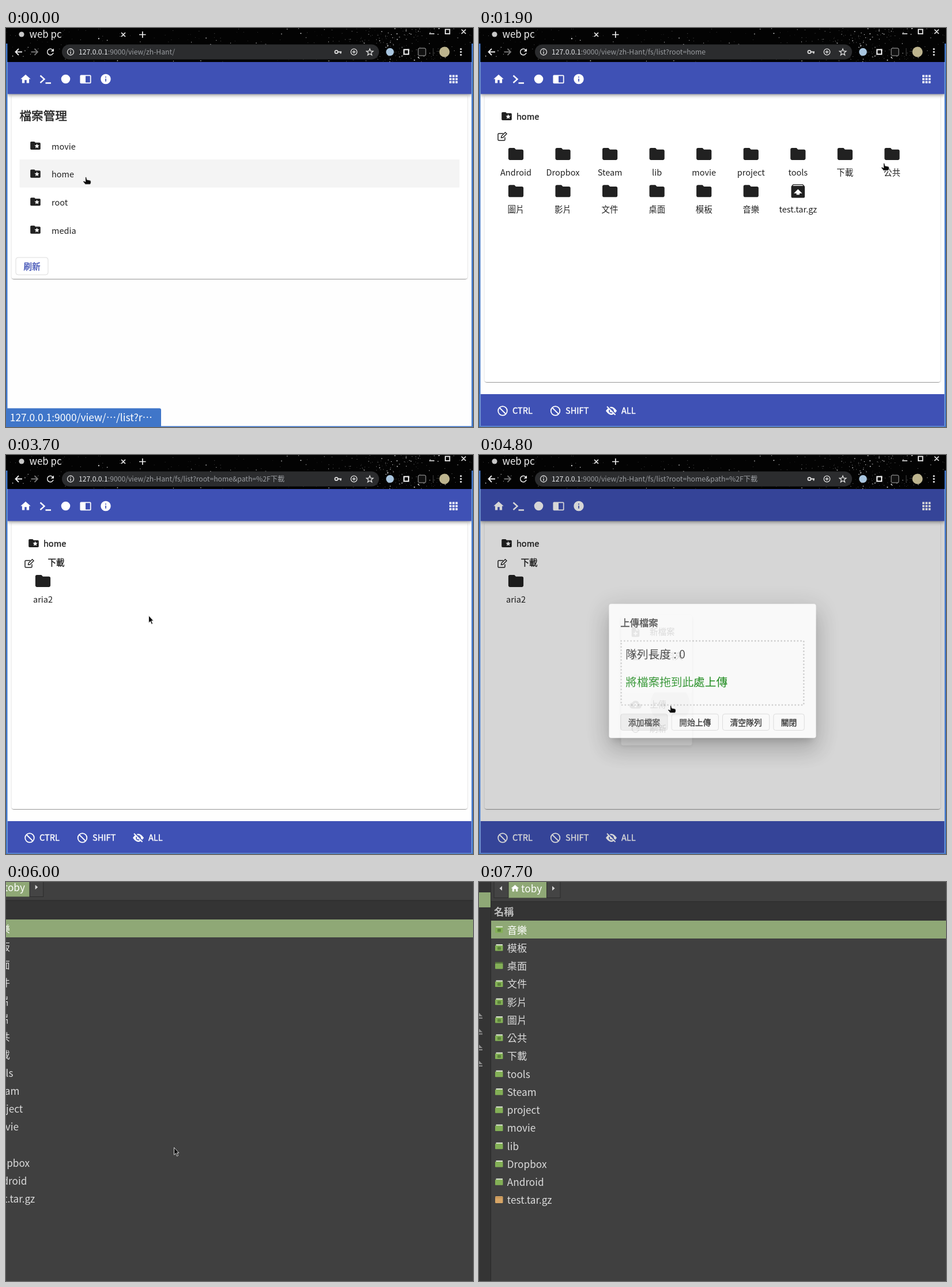
These frames come from a looping animation (810 by 692 pixels, 8000 ms). An HTML page:

```html
<!DOCTYPE html>
<html lang="zh-Hant">
<head>
<meta charset="utf-8">
<title>web pc</title>
<style>
html, body { margin: 0; width: 100%; height: 100%; overflow: hidden; background: #fff; }
svg { display: block; width: 100%; height: 100%; }
text { font-family: "Noto Sans CJK TC", "Noto Sans CJK SC", "Noto Sans CJK JP", "Noto Sans CJK", sans-serif; white-space: pre; }
</style>
</head>
<body>
<svg viewBox="0 0 810 692" xmlns="http://www.w3.org/2000/svg">
  <defs>
    <clipPath id="page"><rect x="2.5" y="59" width="805" height="631.5"/></clipPath>
    <clipPath id="row"><rect x="24" y="228" width="763" height="48.6"/></clipPath>
    <clipPath id="upload"><rect x="247" y="411.5" width="122" height="42"/></clipPath>
    <clipPath id="add"><rect x="236" y="453" width="87" height="31" rx="4"/></clipPath>
  </defs>
  <g id="view"></g>
</svg>
<script>
const LOOP = 8000, STEP = 100;
const INK = '#212121', INDIGO = '#3f51b5', FRAME = '#4076c9';
const view = document.getElementById('view');
const clamp = v => Math.max(0, Math.min(1, v));
const each = (list, fn) => list.map(fn).join('');

// Drawing helpers
const rect = (x, y, w, h, fill, more = '') => `<rect x="${x}" y="${y}" width="${w}" height="${h}" fill="${fill}" ${more}/>`;
const disc = (x, y, r, fill, more = '') => `<circle cx="${x}" cy="${y}" r="${r}" fill="${fill}" ${more}/>`;
const line = (d, color, w = 1.6, more = '') => `<path d="${d}" fill="none" stroke="${color}" stroke-width="${w}" ${more}/>`;
const text = (x, y, str, size, fill = INK, more = '') => `<text x="${x}" y="${y}" font-size="${size}" fill="${fill}" ${more}>${str}</text>`;
const MIDDLE = 'text-anchor="middle"';
// Medium weight: regular glyphs with a thin outline
const medium = (x, y, str, size, fill = INK, more = '') => text(x, y, str, size, fill, `stroke="${fill}" stroke-width=".4" ${more}`);

// Raised surface; each shadow is offset, blur, spread, opacity
const CARD = [[2, 1, -1, .2], [1, 1, 0, .14], [1, 3, 0, .12]];
const RAISED = [[2, 4, -1, .2], [4, 5, 0, .14], [1, 10, 0, .12]];
const MODAL = [[11, 15, -7, .2], [24, 38, 3, .14], [9, 46, 8, .12]];
const surface = (x, y, w, h, fill, radius, shadows) =>
  each(shadows, ([dy, blur, s, a]) => rect(x - s, y - s + dy, w + 2 * s, h + 2 * s, '#000', `rx="${radius}" opacity="${a}" style="filter:blur(${blur / 2}px)"`)) +
  rect(x, y, w, h, fill, `rx="${radius}"`);

// Icons on a 24 unit grid
const FOLDER = 'M10 4H4C2.9 4 2 4.9 2 6V18C2 19.1 2.9 20 4 20H20C21.1 20 22 19.1 22 18V8C22 6.9 21.1 6 20 6H12z';
const ICONS = {
  home: 'M10 20v-6h4v6h5v-8h3L12 3 2 12h3v8z',
  info: 'M12 2a10 10 0 1 0 0 20a10 10 0 1 0 0-20zM11 11h2v6h-2zM11 7h2v2h-2z',
  book: 'M21 4H3Q1 4 1 6V19Q1 21 3 21H21Q23 21 23 19V6Q23 4 21 4zM21 19H12V6H21z',
  folder: FOLDER,
  special: FOLDER + 'M17.9 17L15 15.3 12.1 17 12.8 13.7 10.3 11.4 13.7 11.1 15 8 16.3 11.1 19.7 11.4 17.2 13.7z',
  archive: 'M20.5 5.2L19 3.5Q18.7 3 18 3H6Q5.3 3 4.9 3.5L3.5 5.2Q3 5.8 3 6.5V19Q3 21 5 21H19Q21 21 21 19V6.5Q21 5.8 20.5 5.2zM12 9.5L17.5 15H14V17H10V15H6.5zM5.1 5L5.9 4H18L18.9 5z',
  fileAdd: 'M14 2H6Q4 2 4 4V20Q4 22 6 22H18Q20 22 20 20V8zM16 16H13V19H11V16H8V14H11V11H13V14H16zM13 9V3.5L18.5 9z',
  folderAdd: FOLDER + 'M19 14H16V17H14V14H11V12H14V9H16V12H19z',
  paste: 'M19 2H15A3 3 0 0 0 9 2H5Q3 2 3 4V20Q3 22 5 22H19Q21 22 21 20V4Q21 2 19 2zM7 5H17V4H19V20H5V4H7z',
  cloud: 'M19.3 10A7.5 7.5 0 0 0 5.3 8A6 6 0 0 0 6 20H19A5 5 0 0 0 19.3 10zM14 13V17H10V13H7L12 8 17 13z',
  reload: 'M17.6 6.4A8 8 0 1 0 19.7 14H17.6A6 6 0 1 1 16.2 7.8L13 11H20V4z'
};
const icon = (name, x, y, k, fill = INK) =>
  `<path transform="translate(${x - 12 * k} ${y - 12 * k}) scale(${k})" fill="${fill}" fill-rule="evenodd" d="${ICONS[name]}"/>`;

// Cursor path: time, x, y of the tip
const TRACK = [
  [0, 138, 257], [100, 139, 257], [900, 139, 257], [1800, 702, 235], [1900, 702, 233],
  [2200, 652, 264], [2400, 596, 242], [2600, 630, 214], [3200, 630, 214], [3700, 247, 278],
  [4100, 247, 278], [4200, 288, 350], [4300, 332, 433], [4800, 332, 433], [5300, 341, 462],
  [5400, 341, 462], [5800, 291, 460], [6300, 291, 460], [6400, 199, 180], [6500, 509, -12]
];
function tip(t) {
  const i = TRACK.findIndex(k => k[0] > t);
  if (i < 0) return TRACK[TRACK.length - 1].slice(1);
  const [t0, x0, y0] = TRACK[i - 1], [t1, x1, y1] = TRACK[i], p = (t - t0) / (t1 - t0);
  return [x0 + (x1 - x0) * p, y0 + (y1 - y0) * p];
}
const ARROW = 'M.5 .5V13.2L3.4 10.5 5.4 15.4 7.6 14.5 5.5 9.8H9z';
const HAND = 'M-.5 2Q.6 .8 1.6 2L2.4 6 8.5 7.3 9.3 9V12L8 14.2H-.5L-4.2 9.5Q-4.300 8.2-2.700 8.400L-.2 9.600z';
function cursor(t) {
  const [x, y] = tip(t);
  const arrow = t >= 6000 || (t >= 3400 && t < 4200);
  return `<path transform="translate(${x} ${y})" d="${arrow ? ARROW : HAND}" fill="#0a0a0a" stroke="#eee" stroke-width=".9"/>`;
}

// Seeded star field behind the window title
let seed = 7;
const rnd = () => (seed = seed * 16807 % 2147483647) / 2147483647;
const stars = each(Array.from({ length: 420 }), (_, i) => {
  const x = i < 260 ? rnd() * 810 : 570 + (rnd() + rnd()) * 100;
  return disc(x.toFixed(1), (rnd() * 59).toFixed(1), (.35 + rnd() ** 4 * .75).toFixed(2), '#fff', `opacity="${(.3 + rnd() * .65).toFixed(2)}"`);
});

const chrome = rect(0, 0, 810, 59, '#030303') + stars +
  disc(27, 11, 4.6, '#c8c8c8') + text(40.5, 17, 'web pc', 16.9, '#f2f2f2') +
  line('M200 8L207 15M207 8L200 15M231 11.5H242.5M236.8 6V17M790 2.5L797.5 10M797.5 2.5L790 10M734 10H743', '#eee', 1.7) +
  rect(762, 2.5, 7.5, 7.5, 'none', 'stroke="#eee" stroke-width="1.8"') +
  line('M28 41.5H16.500M22 36L16.5 41.5 22 47', '#eee', 1.8) +
  line('M43.5 41.5H55M49.5 36L55 41.5 49.5 47', '#777', 1.8) +
  icon('reload', 77, 41.5, .75, '#eee') +
  rect(97, 28.5, 550, 26, '#2b2c2e', 'rx="13"') +
  disc(112, 41.5, 5.5, 'none', 'stroke="#ddd" stroke-width="1.3"') + line('M112 40.7V45M112 38V39.5', '#ddd', 1.4) +
  disc(573, 41.5, 2.6, 'none', 'stroke="#ddd" stroke-width="1.8"') + line('M576 41.5H582M580.5 41.5V44.5', '#ddd', 2) +
  disc(603.5, 41.5, 5.3, 'none', 'stroke="#ddd" stroke-width="1.3"') + line('M600.5 41.5H606.5M603.5 38.5V44.5', '#ddd', 1.3) +
  line('M631 36L632.6 40 636.8 40.2 633.5 42.9 634.6 47 631 44.7 627.4 47 628.5 42.9 625.2 40.2 629.4 40z', '#ddd', 1.3) +
  disc(666, 41.5, 6.8, '#a9c6e0') + rect(690.3, 37.5, 8, 8, '#050505', 'stroke="#fff" stroke-width="2"') +
  rect(715, 35, 13, 13, '#111', 'rx="2" stroke="#aaa"') + rect(740.5, 35, 1, 13, '#444') + disc(760.5, 41.5, 9, '#bdb48e') +
  each([36.5, 41.5, 46.5], y => disc(789, y, 1.6, '#eee'));

const windowEdge = rect(0, 27, 2.5, 665, FRAME) + rect(807.5, 27, 2.5, 665, FRAME) + rect(0, 690.5, 810, 1.5, FRAME);

const appBar = surface(2.5, 59, 805, 55.5, INDIGO, 0, RAISED) +
  icon('home', 34, 88.5, .87, '#fff') +
  line('M59.5 82.5L66.5 88.8 59.5 95M68.5 95.5H78', '#fff', 2.4) +
  disc(103.5, 88.5, 7.8, '#fff') + icon('book', 138, 88.5, .87, '#fff') + icon('info', 173, 88.5, .87, '#fff') +
  each([0, 1, 2, 3, 4, 5, 6, 7, 8], i => rect(769 + i % 3 * 5.3, 81.5 + (i / 3 | 0) * 5.3, 3.7, 3.7, '#fff'));

const block = x => disc(x, 664, 7.8, 'none', 'stroke="#fff" stroke-width="1.8"') + line(`M${x - 5.5} 658.5L${x + 5.5} 669.5`, '#fff', 1.8);
const bottomBar = rect(2.5, 635, 805, 56, INDIGO) + block(41) + block(132.5) +
  '<path d="M220 664Q229.5 650 239 664Q229.5 678 220 664z" fill="#fff"/>' +
  disc(229.5, 664, 4.4, INDIGO) + disc(229.5, 664, 2.6, '#fff') +
  line('M223.5 656L238 670.5', INDIGO, 2) + line('M222 656.5L236.5 671', '#fff', 1.8) +
  each([[58, 'CTRL'], [150, 'SHIFT'], [247, 'ALL']], ([x, s]) => medium(x, 669.3, s, 14.6, '#fff'));

const card = bottom => surface(9.5, 116, 791, bottom - 116, '#fff', 4, CARD);

function button(x, y, w, label, fill = INK, bg = '#fff') {
  return rect(x + .5, y + .5, w - 1, 30, bg, 'rx="4" stroke="#dcdcdc"') + medium(x + w / 2, y + 21, label, 14.6, fill, MIDDLE);
}

function homePage(t) {
  const ripple = t >= 600 ? `<g clip-path="url(#row)">${disc(139, 258, 150, '#000', 'opacity=".07"')}</g>` : '';
  return card(435) + medium(23.5, 160, '檔案管理', 20.6) + rect(23.5, 228, 763, 48.6, '#f4f4f4') + ripple +
    each(['movie', 'home', 'root', 'media'], (s, i) => icon('special', 51, 204 + i * 48.6, .88) + text(79, 210.8 + i * 48.6, s, 14.5)) +
    button(16.5, 397.5, 57, '刷新', INDIGO);
}

const FILES = ['Android', 'Dropbox', 'Steam', 'lib', 'movie', 'project', 'tools', '下載', '公共', '圖片', '影片', '文件', '桌面', '模板', '音樂', 'test.tar.gz'];
function listPage(t) {
  const sub = t >= 3400, files = t < 800 ? [] : sub ? ['aria2'] : FILES;
  return card(614) + icon('special', 48, 153, .88) + medium(65, 158.5, 'home', 14.6) +
    line('M42 183H34.5Q33 183 33 184.5V193.5Q33 195 34.5 195H43.5Q45 195 45 193.5V189.5', INK, 1.5) +
    line('M38.5 190.5L39 187.5 45.5 181 48 183.5 41.5 190z', INK, 1.4) +
    (sub ? medium(72.5, 191.7, '下載', 14.5) : '') +
    each(files, (s, i) => {
      const x = 64 + i % 9 * 81.55, y = 218.5 + (i / 9 | 0) * 64.3;
      return icon(s.endsWith('gz') ? 'archive' : 'folder', x, y, 1.31) + text(x, y + 37, s, 14.5, INK, MIDDLE);
    }) + bottomBar;
}

const ITEMS = [['fileAdd', '新檔案'], ['folderAdd', '新資料夾'], ['paste', '貼上'], ['cloud', '上傳'], ['reload', '刷新']];
function menu(t) {
  if (t < 3900 || t >= 4900) return '';
  const hover = t >= 4300 ? rect(246.5, 411.5, 123, 42, '#000', 'opacity=".04"') : '';
  const ripple = t >= 4600 ? `<g clip-path="url(#upload)">${disc(331.5, 433, 34.5, '#000', 'opacity=".1"')}</g>` : '';
  return `<g opacity="${t < 4800 ? 1 : .14}">` + surface(246.5, 277.5, 123, 226, '#fff', 4, RAISED) + hover + ripple +
    each(ITEMS, ([name, s], i) => `<g opacity="${i === 2 ? .38 : 1}">` +
      icon(name, 271.5, 307 + i * 42, .85, '#757575') + text(296, 312 + i * 42, s, 14.5) + '</g>') + '</g>';
}

function dialog(t) {
  if (t < 4800) return '';
  const opening = t < 4900;
  const shade = .32 * (1 - (1 - clamp((t - 4700) / 400)) ** 2.4);
  const grow = clamp((t - 5600) / 200);
  const ripple = grow ? `<g clip-path="url(#add)">${disc(292, 463, 25 * grow, '#000', 'opacity=".1"')}</g>` : '';
  return rect(2.5, 59, 805, 632, '#000', `opacity="${shade}"`) +
    `<g opacity="${opening ? .86 : 1}" transform="translate(405 374.5) scale(${opening ? .945 : 1}) translate(-405 -374.5)">` +
    surface(215, 251.5, 380, 246, '#fff', 4, MODAL) +
    medium(236, 293, '上傳檔案', 17.3) +
    rect(237.5, 319.5, 335, 117.5, 'none', 'stroke="#cfcfcf" stroke-width="3" stroke-linecap="round" stroke-dasharray="0 6"') +
    text(245.5, 351.5, '隊列長度 : 0', 20.8) + text(245.5, 403, '將檔案拖到此處上傳', 20.8, '#008000') +
    button(236, 453, 87, '添加檔案', INK, opening ? '#efefef' : '#dfdfdf') + button(329.5, 453, 87, '開始上傳') +
    button(423, 453, 87, '清空隊列') + button(516.5, 453, 57.5, '關閉') + ripple + '</g>';
}

function browser(t) {
  const path = '/view/zh-Hant/' + (t < 700 ? '' : 'fs/list?root=home') + (t < 3400 ? '' : '&amp;path=%2F下載');
  const url = text(126, 46, `127.0.0.1<tspan fill="#9a9da1">:9000${path}</tspan>`, 12.2, '#e8eaed');
  const status = t < 1200 ? rect(0, 659.5, 269, 33, FRAME, 'rx="3"') + text(6.8, 682, '127.0.0.1:9000/view/⋯/list?r⋯', 17.4, '#fff') : '';
  return chrome + url + rect(2.5, 59, 805, 632, '#fefefe') +
    `<g clip-path="url(#page)">${(t < 700 ? homePage(t) : listPage(t)) + appBar + dialog(t) + menu(t)}</g>` +
    windowEdge + status + cursor(t);
}

const ROWS = ['音樂', '模板', '桌面', '文件', '影片', '圖片', '公共', '下載', 'tools', 'Steam', 'project', 'movie', 'lib', 'Dropbox', 'Android', 'test.tar.gz'];
function rowIcon(i, y) {
  if (i === 15) return rect(28, y - 7, 13.5, 12, '#d6a566', 'rx="1.5"') + rect(28, y - 5, 13.5, 1, '#b98748');
  const badge = i < 8 && i !== 2 ? rect(32, y - 2, 6, 5, '#4f7431', 'rx="1" opacity=".75"') : '';
  const lid = i === 2 ? rect(28, y - 7, 13.5, 2, '#56793b') : rect(29.5, y - 6.5, 11.5, 3, '#dfe8d4');
  return lid + rect(28, y - 4.5, 13.5, 9.5, '#83b056', 'rx="1"') + badge;
}
function picker(t) {
  const p = clamp((t - 7200) / 500), ease = p * p * (3 - 2 * p);
  const green = '#8fa876';
  return rect(0, 0, 810, 692, '#404040') + `<g transform="translate(${-76.3 * (1 - ease)} ${-2 * (1 - ease)})">` +
    rect(-80, 0, 100, 700, '#343434') + rect(-80, 18, 100, 26, green) + rect(20, 0, 1, 700, '#292929') +
    each([233, 260.5, 288, 316], y => `<path d="M-6 ${y}L0 ${y - 6} 6 ${y}z" fill="#8b8b8b"/>` + rect(-6, y + 2, 12, 2, '#8b8b8b')) +
    rect(26, -5, 115, 32.5, '#444', 'stroke="#2c2c2c"') + rect(51, -5, 66, 32.5, green) +
    rect(50.5, -5, 1, 32.5, '#2c2c2c') + rect(117, -5, 1, 32.5, '#2c2c2c') +
    '<path d="M40 7V15L35.5 11zM127 7V15L131.5 11z" fill="#d8d8d8"/>' +
    icon('home', 62.5, 11, .68, '#fff') + text(73, 18, 'toby', 17.2, '#fff') +
    rect(21, 33.5, 900, 33.5, '#343434') + rect(21, 33.5, 900, 1, '#2b2b2b') +
    text(26, 57.5, '名稱', 17.2, '#bdbdbd', 'font-weight="700"') + rect(21, 67, 900, 31, green) +
    each(ROWS, (s, i) => rowIcon(i, 83.3 + i * 31.25) + text(48.8, 89.5 + i * 31.25, s, 17.2, i ? '#dcdcdc' : '#fff')) +
    '</g>' + (t < 6700 ? cursor(t) : '');
}

let shown = -1;
function frame(now) {
  const t = Math.floor(now % LOOP / STEP) * STEP;
  if (t !== shown) {
    shown = t;
    view.innerHTML = t < 6000 ? browser(t) : picker(t);
  }
  requestAnimationFrame(frame);
}
frame(performance.now());
</script>
</body>
</html>
```
